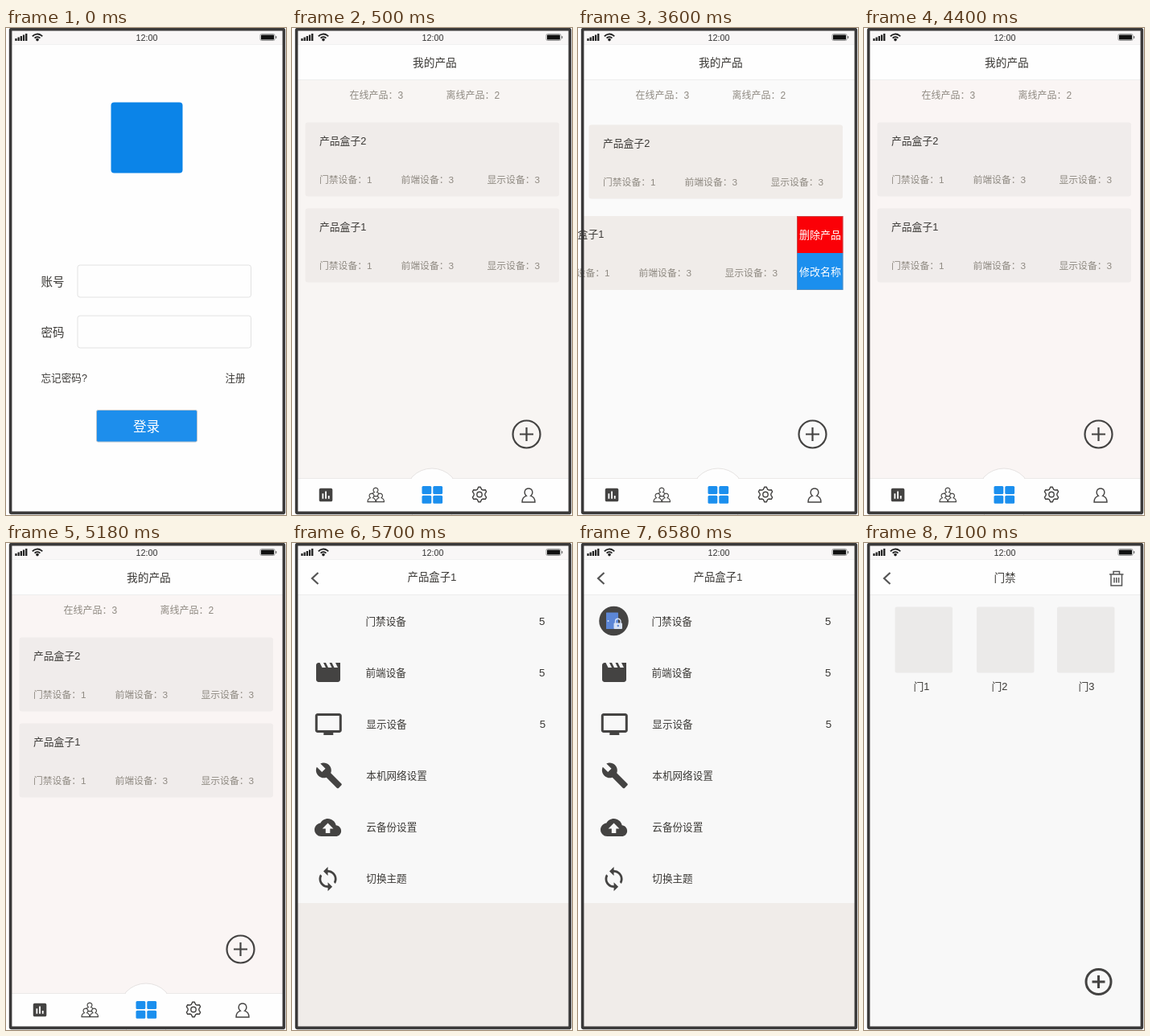
An HTML page with a canvas for the animation above (8 s loop, 348 px wide and 606 px high).

```html
<!DOCTYPE html>
<html lang="zh-CN">
<head>
<meta charset="utf-8">
<style>
html, body { margin: 0; width: 100%; height: 100%; overflow: hidden; background: #fff; }
canvas { display: block; width: 348px; height: 606px; }
</style>
</head>
<body>
<canvas id="stage"></canvas>
<script>
const W = 348, H = 606, LOOP = 8000;
const FONT = '"Liberation Sans", "Noto Sans CJK SC", "Noto Sans CJK", sans-serif';
const INK = '#444342', TEXT = '#3b3936', GRAY = '#8f8a82', BLUE = '#1b8fee';
const canvas = document.getElementById('stage');
const ctx = canvas.getContext('2d');
const ratio = window.devicePixelRatio || 1;
canvas.width = W * ratio;
canvas.height = H * ratio;

const ICONS = {
  chart: 'M19 3H5c-1.1 0-2 .9-2 2v14c0 1.1.9 2 2 2h14c1.1 0 2-.9 2-2V5c0-1.1-.9-2-2-2zM9 17H7v-7h2v7zm4 0h-2V7h2v10zm4 0h-2v-4h2v4z',
  clapper: 'M18 4l2 4h-3l-2-4h-2l2 4h-3l-2-4H8l2 4H7L5 4H4c-1.1 0-2 .9-2 2v12c0 1.1.9 2 2 2h16c1.1 0 2-.9 2-2V4h-4z',
  screen: 'M21 3H3c-1.1 0-2 .9-2 2v12c0 1.1.9 2 2 2h5v2h8v-2h5c1.1 0 2-.9 2-2V5c0-1.1-.9-2-2-2zm0 14H3V5h18v12z',
  wrench: 'M22.7 19l-9.1-9.1c.9-2.3.4-5-1.5-6.9-2-2-5-2.4-7.4-1.3L9 6 6 9 1.6 4.7C.4 7.1.9 10.1 2.9 12.1c1.9 1.9 4.6 2.4 6.9 1.5l9.1 9.1c.4.4 1 .4 1.4 0l2.3-2.3c.5-.4.5-1.1.1-1.4z',
  cloud: 'M19.35 10C18.67 6.6 15.64 4 12 4 9.1 4 6.6 5.64 5.35 8 2.34 8.36 0 10.9 0 14c0 3.3 2.7 6 6 6h13c2.76 0 5-2.24 5-5 0-2.64-2.05-4.78-4.65-5zM14 13v4h-4v-4H7l5-5 5 5h-3z',
  sync: 'M12 4V1L8 5l4 4V6c3.3 0 6 2.7 6 6 0 1-.25 2-.7 2.8l1.46 1.46C19.54 15 20 13.57 20 12c0-4.4-3.6-8-8-8zm0 14c-3.3 0-6-2.7-6-6 0-1 .25-2 .7-2.8L5.24 7.74C4.46 9 4 10.4 4 12c0 4.4 3.6 8 8 8v3l4-4-4-4v3z'
};
for (const name in ICONS) ICONS[name] = new Path2D(ICONS[name]);

function rect(x, y, w, h, color, radius = 0, stroke) {
  ctx.beginPath();
  ctx.roundRect(x, y, w, h, radius);
  if (color) { ctx.fillStyle = color; ctx.fill(); }
  if (stroke) { ctx.strokeStyle = stroke; ctx.lineWidth = 1; ctx.stroke(); }
}

function disc(x, y, r, color) {
  ctx.beginPath();
  ctx.arc(x, y, r, 0, Math.PI * 2);
  ctx.fillStyle = color;
  ctx.fill();
}

function stroke(path, width = 1.4, color = INK, fill) {
  const shape = new Path2D(path);
  if (fill) { ctx.fillStyle = fill; ctx.fill(shape); }
  ctx.lineWidth = width;
  ctx.strokeStyle = color;
  ctx.stroke(shape);
}

// y is the vertical middle of the glyphs
function text(str, x, y, size, color = TEXT, weight = 400) {
  ctx.font = `${weight} ${size}px ${FONT}`;
  ctx.fillStyle = color;
  ctx.fillText(str, x, y + size * 0.37);
}

function icon(name, x, y, scale) {
  ctx.save();
  ctx.translate(x, y);
  ctx.scale(scale, scale);
  ctx.fillStyle = INK;
  ctx.fill(ICONS[name]);
  ctx.restore();
}

function plusButton(y, r, arm, width) {
  ctx.beginPath();
  ctx.arc(291.5, y, r, 0, Math.PI * 2);
  ctx.moveTo(291.5 - arm, y);
  ctx.lineTo(291.5 + arm, y);
  ctx.moveTo(291.5, y - arm);
  ctx.lineTo(291.5, y + arm);
  ctx.strokeStyle = INK;
  ctx.lineWidth = width;
  ctx.stroke();
}

function header(title, x, size, back) {
  rect(6, 20, 338, 44.5, '#fefefe');
  rect(6, 64, 338, 1, '#ededed');
  text(title, x, 42.5, size, TEXT, back ? 400 : 300);
  if (back) stroke('M32.5 37 L25 44 L32.5 51', 2.2, '#555');
}

function statusBar() {
  rect(6, 3, 338, 17, '#f9f7f7');
  rect(6, 20, 338, 0.8, '#ececec');
  for (let i = 0; i < 5; i++) {
    const h = 3 + i * 1.5;
    rect(11.3 + i * 3.2, 16 - h, 2.3, h, '#222');
  }
  ctx.strokeStyle = '#222';
  ctx.lineWidth = 1.8;
  for (const r of [4.4, 8]) {
    ctx.beginPath();
    ctx.arc(39, 15.5, r, -Math.PI * 0.78, -Math.PI * 0.22);
    ctx.stroke();
  }
  disc(39, 14.6, 1.8, '#222');
  text('12:00', 161.5, 11.7, 10.8, '#333');
  rect(316, 7.5, 18, 8, '#fff', 1.5, '#999');
  rect(317, 8.5, 16, 6, '#111', 0.5);
  rect(335, 10, 1.3, 3, '#777');
}

function bezel() {
  rect(5.6, 1.6, 339.8, 601.8, null, 1);
  ctx.strokeStyle = '#3a3939';
  ctx.lineWidth = 3.6;
  ctx.stroke();
}

function person(x, y, s, width, fill) {
  ctx.save();
  ctx.translate(x, y);
  ctx.scale(s, s);
  stroke('M-8 9 C-8 4 -5.5 2 -2.6 1.2 C-6.5 -2 -5 -8 0 -8 C5 -8 6.5 -2 2.6 1.2 C5.5 2 8 4 8 9 Z', width / s, INK, fill);
  ctx.restore();
}

function gear(x, y) {
  ctx.beginPath();
  for (let i = 0; i < 24; i++) {
    const a = (i + 0.5) * Math.PI / 12;
    const r = i % 4 < 2 ? 9.3 : 6.9;
    ctx.lineTo(x + r * Math.sin(a - Math.PI / 12), y - r * Math.cos(a - Math.PI / 12));
  }
  ctx.closePath();
  ctx.moveTo(x + 3.2, y);
  ctx.arc(x, y, 3.2, 0, Math.PI * 2);
  ctx.lineWidth = 1.4;
  ctx.strokeStyle = INK;
  ctx.stroke();
}

function navBar() {
  ctx.beginPath();
  ctx.arc(174, 582, 34, 0, Math.PI * 2);
  ctx.fillStyle = '#fefefe';
  ctx.fill();
  ctx.strokeStyle = '#e6e3e2';
  ctx.lineWidth = 1;
  ctx.stroke();
  rect(6, 560, 338, 42, '#fefefe');
  rect(6, 560, 143, 1, '#ebe9e8');
  rect(199, 560, 145, 1, '#ebe9e8');
  icon('chart', 31, 570, 0.92);
  person(104, 577, 0.62, 1.2);
  person(99, 584, 0.62, 1.2, '#fefefe');
  person(109.5, 584, 0.62, 1.2, '#fefefe');
  for (const x of [161.5, 175.3])
    for (const y of [570, 581.8]) rect(x, y, 11.8, 10, BLUE, 1.5);
  gear(233, 580.5);
  person(294, 581, 1, 1.4);
}

function cardText(name, dx, dy) {
  text(name, 34 + dx, 140 + dy, 12.8);
  const labels = [['门禁设备：1', 34], ['前端设备：3', 135.5], ['显示设备：3', 242.5]];
  for (const [label, x] of labels) text(label, x + dx, 188.5 + dy, 11.8, GRAY, 500);
}

function login() {
  rect(6, 3, 338, 599, '#fefefe');
  rect(130.5, 92.5, 89, 88, '#0b84e8', 4);
  text('账号', 43.5, 315.5, 14.5);
  text('密码', 43.5, 378.5, 14.5);
  for (const y of [295, 358]) rect(89, y, 215.5, 40, '#fefefe', 3, '#e2e2e2');
  text('忘记密码?', 43.5, 435, 12.6);
  text('注册', 272.5, 435, 12.6);
  rect(112.5, 475.5, 125, 39.5, '#1d8eec', 2, '#b9c4cd');
  text('登录', 158, 496, 16.6, '#fff');
}

function products(background, card, swiped) {
  rect(6, 3, 338, 599, background);
  header('我的产品', 150, 13.7);
  text('在线产品：3', 71.5, 83.5, 12, GRAY);
  text('离线产品：2', 191.5, 83.5, 12, GRAY);
  const dx = swiped ? -3 : 0, dy = swiped ? 3 : 0;
  rect(16.5 + dx, 117.5 + dy, 315.5, 92, card, 3);
  cardText('产品盒子2', dx, dy);
  if (swiped) {
    rect(6, 234, 266, 92, card);
    cardText('产品盒子1', -60, 116);
    rect(272, 234, 57.5, 46, '#fb0007');
    rect(272, 280, 57.5, 46, BLUE);
    rect(272.5, 234.5, 56.5, 91, null, 0, 'rgba(150,140,140,.45)');
    text('删除产品', 275, 257, 13, '#fff');
    text('修改名称', 275, 303, 13, '#fff');
  } else {
    rect(16.5, 224.5, 315.5, 92, card, 3);
    cardText('产品盒子1', 0, 107);
  }
  plusButton(505.5, 17, 8.5, 2.2);
  navBar();
}

function doorIcon() {
  disc(44.5, 97, 18.3, '#454443');
  rect(35, 86.5, 15, 20.5, '#5c86d6', 0.5);
  disc(37.5, 97, 1, '#dce6f8');
  rect(44.5, 99.5, 10.5, 7.5, '#d8e2f5', 1);
  stroke('M46.5 100 V97.5 A3.2 3.2 0 0 1 53 97.5 V100', 1.4, '#d8e2f5');
  disc(49.8, 103, 1.2, '#5c86d6');
}

function settings(withDoor) {
  rect(6, 3, 338, 599, '#f0ece9');
  rect(6, 64, 338, 384, '#f8f8f8');
  header('产品盒子1', 143.5, 13.4, true);
  const rows = ['门禁设备', '前端设备', '显示设备', '本机网络设置', '云备份设置', '切换主题'];
  rows.forEach((label, i) => {
    const x = i < 2 ? 0 : 0.8, y = 97 + i * 64;
    text(label, 91.5 + x, y + 0.3, 12.6);
    if (i < 3) text('5', 307 + x, y, 13.4);
  });
  if (withDoor) doorIcon();
  icon('clapper', 27, 143, 1.5);
  icon('screen', 27.3, 207.5, 1.5);
  icon('wrench', 28.5, 272, 1.45);
  icon('cloud', 28, 337.5, 1.38);
  icon('sync', 28, 401.5, 1.38);
}

function doors() {
  rect(6, 3, 338, 599, '#f8f8f8');
  header('门禁', 161.5, 13.6, true);
  stroke('M305 39 H322.5 M310 39 V35.5 H317.5 V39 M307 39 V53 H320.5 V39 M311 43 V49.5 M313.8 43 V49.5 M316.6 43 V49.5', 1.5, '#555');
  [[38.5, 61.5], [140, 158.5], [240, 266.5]].forEach(([boxX, textX], i) => {
    rect(boxX, 79.5, 71.5, 82, '#ebeae9', 2);
    text('门' + (i + 1), textX, 178.3, 12.8);
  });
  plusButton(546, 15.5, 8, 3);
}

const SCENES = [
  [500, login],
  [3600, () => products('#f8f5f3', '#f0ecea', false)],
  [4400, () => products('#fafafa', '#f0ece9', true)],
  [5700, () => products('#faf5f4', '#f0eceb', false)],
  [5800, () => settings(false)],
  [7100, () => settings(true)],
  [LOOP, doors]
];

function draw(now) {
  const time = now % LOOP;
  ctx.setTransform(ratio, 0, 0, ratio, 0, 0);
  rect(0, 0, W, H, '#fff');
  SCENES.find(([end]) => time < end)[1]();
  statusBar();
  bezel();
}

const start = performance.now();
function tick() {
  draw(performance.now() - start);
  requestAnimationFrame(tick);
}
tick();
</script>
</body>
</html>
```
